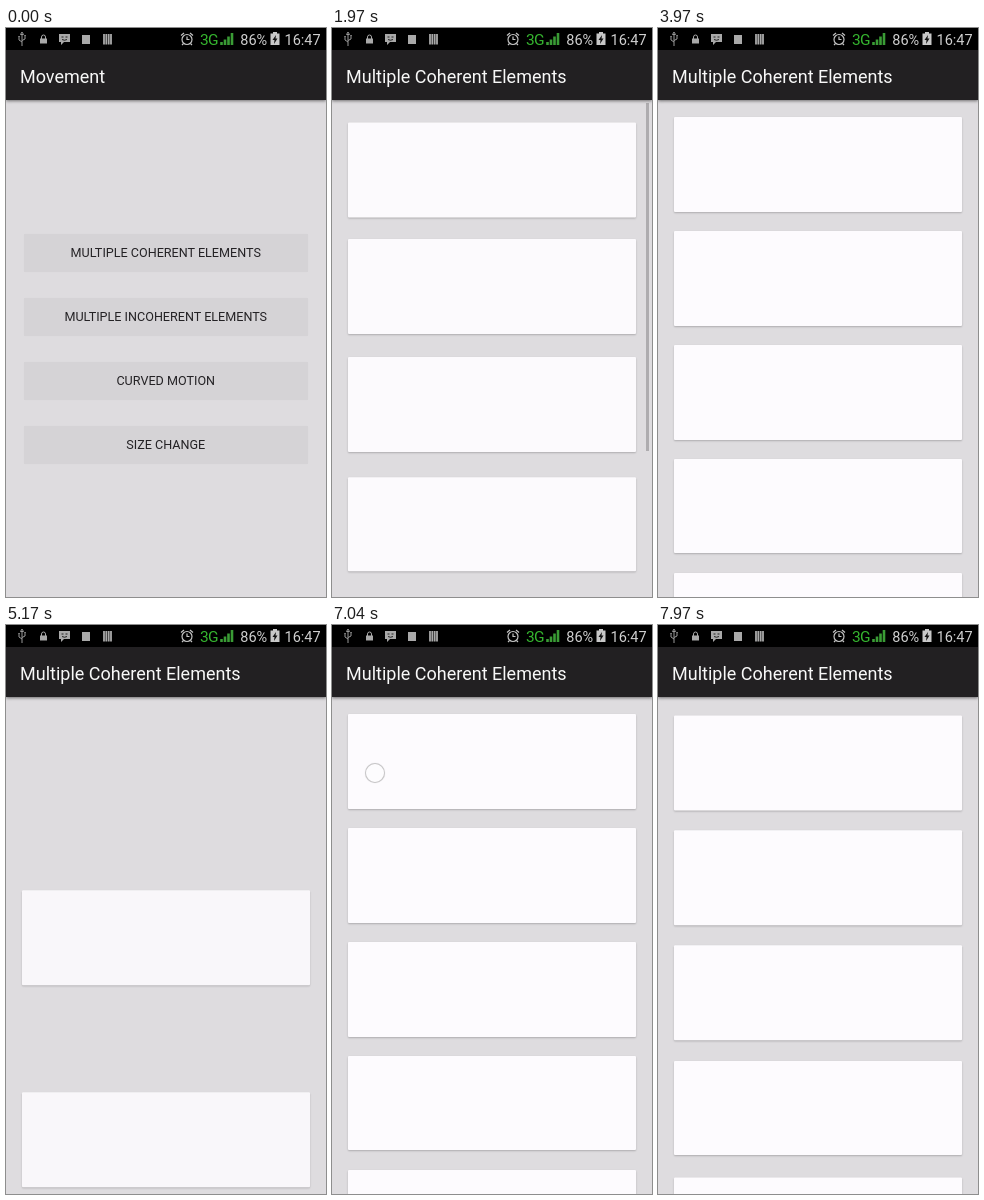
Write an HTML page that moves like this. It is 320x569 px and loops after 8 s.

```html
<!DOCTYPE html>
<html lang="en">
<meta charset="utf-8">
<title>Movement</title>
<style>
  html, body { margin: 0; width: 100%; height: 100%; overflow: hidden; background: #dedcdf; }
  body { position: relative; font-family: Roboto, sans-serif; }
  div, svg { position: absolute; }
  #status { left: 0; top: 0; background: #000; }
  #bar { left: 0; top: 22px; width: 320px; height: 50px; background: #222022; box-shadow: 0 1px 3px rgba(0,0,0,.5); }
  #title { left: 14px; top: 1px; line-height: 51px; font-size: 18px; color: #f8f8f8; white-space: nowrap; }
  .button { left: 17.5px; width: 284.5px; height: 38px; line-height: 38px; text-align: center;
    font-size: 12.6px; color: #242225; background: #d5d3d6; border-radius: 1px;
    box-shadow: 0 0 1px rgba(0,0,0,.05); }
  .button.pressed { background: #cbc9cc; box-shadow: 0 2px 4px rgba(0,0,0,.3); }
  .card { left: 16px; width: 288px; height: 94.5px; background: #fdfbfe; border-radius: 1px;
    box-shadow: 0 1px 2px rgba(0,0,0,.22); }
  #scroll { left: 314px; top: 75px; width: 3px; height: 348px; background: #aeacaf; }
  #dot { width: 18px; height: 18px; margin: -10px; border: 1px solid rgba(0,0,0,.22); border-radius: 50%;
    background: rgba(255,255,255,.3); box-shadow: 0 0 1px rgba(0,0,0,.15); }
  #dot.faded { border-color: transparent; box-shadow: none; }
</style>
<body>
<div id="menu"></div>
<div id="list"></div>
<div id="scroll"></div>
<div id="dot"></div>
<div id="bar"><div id="title"></div></div>
<svg id="status" width="320" height="22" fill="#a9a9a9" font-family="Roboto, sans-serif" font-size="14.5">
  <!-- usb -->
  <g fill="none" stroke="#999">
    <path d="M16 16V6M16 14L13 12V9M16 12.5L19 11V8"/>
    <path d="M14.5 6.5L16 4l1.5 2.5zM15 17h2M12.3 8.5h1.5M18.3 7.5h1.5"/>
  </g>
  <!-- lock -->
  <path d="M34 10.5h7v5h-7z"/>
  <path d="M35.5 11V9a2 2 0 0 1 4 0v2" fill="none" stroke="#a9a9a9"/>
  <!-- message -->
  <path d="M53 6h11v8h-6l-3 3v-3h-2z"/>
  <path d="M55.5 9h2M59.5 9h2M56 11.5q2.5 1.500 5 0" fill="none" stroke="#222"/>
  <rect x="76" y="7" width="8" height="9"/>
  <path d="M98 6v10.5M100.3 6v10.5M102.7 6v10.5M105 6v10.5" stroke="#a9a9a9" stroke-width="1.8"/>
  <!-- alarm -->
  <g fill="none" stroke="#c4c4c4" stroke-width="1.2">
    <circle cx="181" cy="11.5" r="5"/>
    <path d="M181 8.5v3h2.5M175 7.5l3-2.5M187 7.5l-3-2.5M177.5 15.5l-1.5 1.5M184.5 15.5l1.5 1.5"/>
  </g>
  <text x="194" y="16.5" font-size="15.5" letter-spacing="-.8" fill="#35b52f">3G</text>
  <path d="M215.5 17v-3M219 17v-5.5M222.5 17v-8.5M226 17V5" stroke="#3a9c35" stroke-width="2.6"/>
  <text x="234.3" y="16.5" fill="#d0d0d0">86%</text>
  <path d="M267 4h4v1.5h2.5V17h-9V5.5h2.5z" fill="#c8c8c8"/>
  <path d="M270 7l-3.5 5h2l-.5 4 3.5-5.5h-2z" fill="#111"/>
  <text x="278.5" y="16.5" fill="#d0d0d0">16:47</text>
</svg>
<script>
const $ = id => document.getElementById(id);
const LOOP = 8000, STEP = 66.667;
const OPEN = 1233, ENTER = 1000, OFFSET = 227, GROWTH = 1.5;
const labels = ['Multiple Coherent Elements', 'Multiple Incoherent Elements', 'Curved Motion', 'Size Change'];
// start and end of each list entrance
const runs = [[1172, 2172], [3020, 3960], [5099, 6099], [7077, 8077]];
// time, x, y of each touch
const taps = [[2966, 53.5, 140], [4966, 46, 146], [7033, 43, 148]];

function add(parent, className, top, text = '') {
  const el = document.createElement('div');
  el.className = className;
  el.style.top = top + 'px';
  el.textContent = text;
  return $(parent).appendChild(el);
}
$('menu').style.width = $('list').style.width = '320px';
const buttons = labels.map((s, i) => add('menu', 'button', 206 + 64 * i, s.toUpperCase()));
const cards = [0, 1, 2, 3, 4].map(i => add('list', 'card', 89.2 + 113.9 * i));

// cubic-bezier(0, 0, .2, 1), solved by bisection
function slowIn(x) {
  let lo = 0, hi = 1;
  for (let i = 0; i < 24; i++) {
    const s = (lo + hi) / 2;
    if (.6 * s * s + .4 * s ** 3 < x) lo = s; else hi = s;
  }
  return lo * lo * (3 - 2 * lo);
}

function placeCards(t) {
  const run = runs.findLast(r => t >= r[0]);
  const p = !run || t >= run[1] ? 1 : slowIn((t - run[0]) / ENTER);
  cards.forEach((card, i) => {
    card.style.transform = `translateY(${OFFSET * GROWTH ** i * (1 - p)}px)`;
    card.style.opacity = .85 + .15 * p;
  });
}

function placeDot(t) {
  const tap = taps.find(a => t >= a[0] && t < a[0] + 170);
  $('dot').style.display = tap ? '' : 'none';
  if (!tap) return;
  $('dot').style.left = tap[1] + 'px';
  $('dot').style.top = tap[2] + 'px';
  $('dot').classList.toggle('faded', t > tap[0] + 100);
}

function draw(time) {
  const t = Math.floor((time - 33) / STEP) * STEP + 33.4;
  const open = t >= OPEN;
  $('menu').style.display = open ? 'none' : '';
  $('list').style.display = open ? '' : 'none';
  $('title').textContent = open ? labels[0] : 'Movement';
  buttons[0].classList.toggle('pressed', t >= 499 && t < 1099);
  $('scroll').style.opacity = open ? Math.max(0, Math.min(1, 1 - (t - 2367) / 200)) : 0;
  placeCards(t);
  placeDot(t);
}

const begin = performance.now();
function tick() {
  draw((performance.now() - begin) % LOOP);
  requestAnimationFrame(tick);
}
tick();
</script>
</body>
</html>
```
